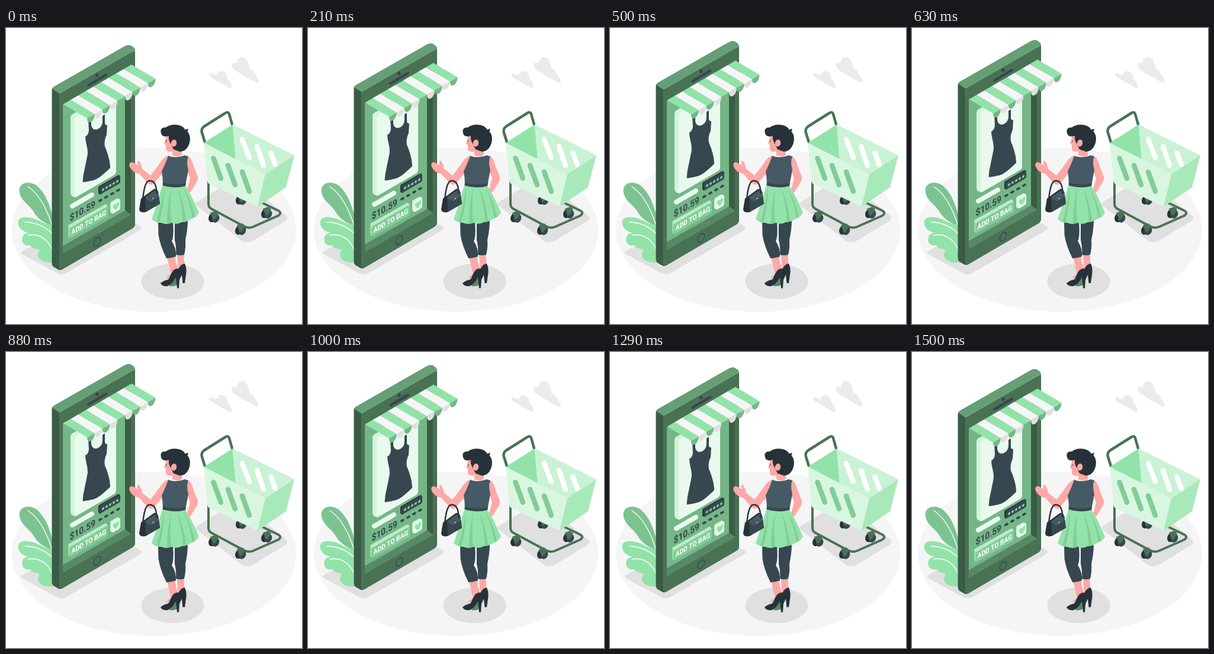
Recreate the animation shown at these times as an HTML page with a canvas. Size 500x500 px, loop 1.54 s.

```html
<!DOCTYPE html>
<html lang="en">
<head>
<meta charset="utf-8">
<title>Mobile shopping</title>
<style>
html, body { margin: 0; width: 100%; height: 100%; overflow: hidden; background: #fff; }
canvas { display: block; width: 500px; height: 500px; }
</style>
</head>
<body>
<canvas id="stage"></canvas>
<script>
const SIZE = 500, LOOP = 1540, STEPS = 37, LIFT = 10, REST = 1.2;
const canvas = document.getElementById('stage');
const ctx = canvas.getContext('2d');
const ratio = window.devicePixelRatio || 1;
canvas.width = canvas.height = SIZE * ratio;

const C = {
  green: '#92e3a9', mid: '#83cc98', leaf: '#7dc391', shade: '#75b687', moss: '#669f76', deep: '#588865',
  forest: '#497255', pine: '#3a5b44', pale: '#d3f4dc', mint: '#e9f9ee',
  slate: '#37474f', ink: '#263238', steel: '#455a64', skin: '#ffa8a7',
  floor: '#f5f5f5', shadow: '#e0e0e0', cloud: '#ebebeb', white: '#fff'
};

function fill(color, d) {
  ctx.fillStyle = color;
  ctx.fill(new Path2D(d));
}

function stroke(color, width, d) {
  ctx.strokeStyle = color;
  ctx.lineWidth = width;
  ctx.lineCap = ctx.lineJoin = 'round';
  ctx.stroke(new Path2D(d));
}

function ellipse(color, x, y, rx, ry = rx, angle = 0) {
  ctx.fillStyle = color;
  ctx.beginPath();
  ctx.ellipse(x, y, rx, ry, angle, 0, 7);
  ctx.fill();
}

// Draws in the isometric plane of the phone's front, with its origin at x, y.
function onFront(x, y, draw) {
  ctx.save();
  ctx.transform(0.866, -0.5, 0, 1, x, y);
  draw();
  ctx.restore();
}

function label(text, x, y, size, color) {
  onFront(x, y, () => {
    ctx.font = `bold ${size}px Roboto, sans-serif`;
    ctx.fillStyle = color;
    ctx.fillText(text, 0, 0);
  });
}

function star(x, y, r) {
  onFront(x, y, () => {
    ctx.beginPath();
    for (let i = 0; i < 10; i++) {
      const a = i * Math.PI / 5, d = i % 2 ? r * 0.45 : r;
      ctx.lineTo(d * Math.sin(a), -d * Math.cos(a));
    }
    ctx.fillStyle = C.green;
    ctx.fill();
  });
}

function drawGround() {
  ellipse(C.floor, 250, 341, 240, 138.5);
  fill(C.shadow, 'M27 377 L90 342 L180 308 L227 335 Q232 338 226 342 L102 414 Q95 418 88 415 L27 382 Q23 379 27 377Z');
  fill(C.shadow, 'M322 294 L370 265 H410 L472 316 Q478 321 472 326 L416 360 Q407 364 399 360 L322 300 Q319 297 322 294Z');
  ellipse(C.shadow, 281.5, 428, 53, 30);
}

function drawClouds() {
  fill(C.cloud, 'M343 78 Q346 74 352 79 Q356 81 359 74 Q364 71 368 74 Q374 77 374 86 Q382 93 381 101 Q378 102 374 99 L347 84 Q344 81 343 78Z');
  fill(C.cloud, 'M381 61 Q384 57 389 60 Q391 49 399 49 Q407 50 409 60 Q412 67 412 70 Q418 69 420 78 Q427 85 427 92 Q424 93 420 91 L386 71 Q381 66 381 61Z');
}

function drawLeaves() {
  fill(C.leaf, 'M22.500 274 C23 260 42 257 54 268 C68 281 74 301 79 318 V335 C64 329 53 322 47 311 C40 298 23 292 22.500 274Z');
  stroke(C.white, 1.4, 'M37 268 Q62 284 78 334');
  fill(C.green, 'M20.500 328 C21 318 36 318 48 322 C60 327 68 333 80 332 V396 C68 397 56 394 54 385 C53 380 57 378 56 374 C50 373 44 372 41 367 C32 369 26 364 27.500 355 C28 349 32 347 38 346 C28 344 20 337 20.500 328Z');
  stroke(C.white, 1.3, 'M32 328 Q58 328 78 347');
  stroke(C.white, 1.3, 'M37 350 Q64 345 78 374');
}

function drawCase() {
  fill(C.pine, 'M77.5 104 Q77.5 100 81 98 L200 30 Q207 26 212 29 L214 31 Q218 33 218 38 L218 330 Q218 334 214 337 L96 406 Q91 409 87 406 L80 402 Q77.5 400 77.5 396Z');
  fill(C.moss, 'M79 101 Q79 99 82 97.5 L200 30 Q207 26 212 29 L215 31 Q218 33 218 38 L91 109.5Z');
  fill(C.forest, 'M90.5 113 Q90.5 110 94 107.5 L211 40 Q217.5 36 217.5 42 L217.5 330 Q217.5 334 214 337 L96 405.5 Q90.5 408 90.5 403Z');
  stroke('#83b592', 0.7, 'M79 102 L90.5 109 L214 38');
  stroke('#5f8d6d', 0.6, 'M90.5 110 V404');
  stroke(C.slate, 4.5, 'M139.5 95.5 L169 78');
  ellipse(C.slate, 154, 78.5, 2.7, 3.2);
  onFront(154, 360, () => stroke(C.slate, 1.5, 'M-6.6 0 A6.6 6.6 0 1 1 6.6 0 A6.6 6.6 0 1 1 -6.6 0Z'));
  fill(C.shade, 'M96 128 L211 62 V314 L96 380Z');
  fill(C.pine, 'M211 62 V314 L201 307 V68Z');
  fill(C.deep, 'M96 380 L211 314 L201 307 L96 367Z');
}

function drawDressCard() {
  fill(C.pale, 'M109 150 Q109 146 113 144 L180 106 L186 112 L118 285 Q116 285 112 283 Q109 281 109 278Z');
  fill(C.mint, 'M116 154 Q116 150 120 147.5 L186 109 V241 Q186 245 182 247.5 L121 283 Q116 286 116 281Z');
  fill(C.slate, 'M139 154 L144 151 V163 Q146 172 154 170 Q162 167 163 158 V147 L167 145 V160 Q168 163 171 163 L170 179 Q165 190 167 199 Q172 210 175 224 Q176 232 176 235 Q171 240 164 246 Q153 256 143 257 Q134 259 129.5 259 Q130 248 133 236 Q136 222 138 211 Q138 203 136 196 Q134 188 134 182 Q139 180 140 172Z');
}

function drawDetails() {
  fill(C.ink, 'M156 269 Q156 266 159 265 L190 247 L193 249 L160 280 Q156 280 156 277Z');
  fill(C.slate, 'M158 270 Q158 267 161 265.5 L190 248.5 Q193 247 193 250 V258 Q193 260.5 190.5 262 L161 279 Q158 280.5 158 278Z');
  for (let i = 0; i < 5; i++) star(164 + 6 * i, 271.7 - 3.45 * i, 3.3);
  for (let i = 0; i < 4; i++) {
    stroke(C.slate, 3.7, `M${157.8 + 10 * i} ${291 - 5.75 * i} l3.2 -1.85`);
  }
  stroke(C.mint, 8, 'M112 299.5 L145 280.5');
  label('$10.59', 107.5, 325.5, 15.9, C.slate);
}

function drawButtons() {
  fill('#b8edc6', 'M105 332 L167 297 Q169 296 171 299 L172 303 L108 339Z');
  fill(C.green, 'M105 332 L108 338 V354 L105 350Z');
  fill(C.mid, 'M107.5 340 Q107.5 337 110 335.5 L169 301.5 Q172 300 172 303 V315 Q172 317.5 169.5 319 L110.5 353 Q107.5 354.5 107.5 351.5Z');
  label('ADD TO BAG', 110.5, 348, 11.8, C.white);

  fill(C.pale, 'M176 296 Q176 293 179 291.5 L188 286.5 Q190 286 193 289 L180 312 Q176 311 176 308Z');
  fill(C.mint, 'M179 298 Q179 295 181.5 293.5 L190 288.5 Q193 287 193 290 V302 Q193 305 190.5 306.5 L182 311.5 Q179 313 179 310Z');
  onFront(186, 300, () =>
    fill(C.green, 'M0 6 C-9 0 -6.5 -6 -3 -5.5 Q-1 -5 0 -3 Q1 -5 3 -5.5 C6.5 -6 9 0 0 6Z'));
}

function drawAwning() {
  const count = 9, dx = 115.5 / count, dy = -67 / count;
  for (let i = 0; i < count; i++) {
    const x = 137 + dx * i, y = 151.5 + dy * i, isGreen = i % 2 === 0;
    fill(isGreen ? C.shade : C.shadow,
      `M${x} ${y} C${x} ${y + 13} ${x + dx} ${y + dy + 13} ${x + dx} ${y + dy}Z`);
    fill(isGreen ? C.green : C.floor,
      `M${x} ${y} l${dx} ${dy} l-40.5 -24 l${-dx} ${-dy}Z`);
  }
}

function drawPhone(lift) {
  ctx.save();
  ctx.translate(0, REST - lift);
  drawCase();
  drawDressCard();
  drawDetails();
  drawButtons();
  drawAwning();
  ctx.restore();
}

function drawWheel(x, y) {
  ellipse(C.ink, x - 2, y + 1, 6.5, 8.5, 0.5);
  ellipse(C.slate, x + 3, y + 2.5, 6, 7.5, 0.5);
  fill(C.forest, `M${x - 6} ${y - 7} l9 -3 l5 4 l-5 9 l-4 2 l-3 -7Z`);
}

function drawCart() {
  drawWheel(397, 289);
  drawWheel(440, 312);
  stroke(C.forest, 4, 'M342 260 V297 Q342 303 347 305.5 L402 335 Q410 339 417 336 L460 317 Q466 313 461 309 L430 294');
  drawWheel(351, 319);
  drawWheel(396, 340);
  stroke(C.forest, 4.5, 'M336 193 L331 177 Q329 170 335 166 L370 144 Q376 140 377.5 147 L382 163');
  fill(C.green, 'M334 194 L383 163 L388 222Z');
  fill('#caf2d5', 'M383 163 L487 215 L438 247 L388 222Z');
  stroke(C.white, 8.5, 'M399 188 L411 219 M424 200 L435 232 M447.5 211 L455 231');
  fill('#d8f6e0', 'M334 194 L438 247 L425 302 L341 262Z');
  fill('#a8e9ba', 'M438 247 L487 215 L473 269 L425 302Z');
  stroke(C.mid, 8.5, 'M350.5 220 L363 254 M375 232 L387 265 M399 243 L411 276');
}

function drawLegs() {
  fill(C.skin, 'M289 382 L301 381 Q300 392 302 402 L293 412 Q289 398 289 382Z');
  fill(C.skin, 'M272 386 L286 385 Q286 398 291 408 L280 420 Q276 405 272 386Z');
  fill(C.slate, 'M285 327 L307 324 Q307 340 303 358 Q304 372 301 383 Q294 385 287 383 Q288 370 285 358Z');
  fill(C.slate, 'M257 327 L282 327 Q284 352 280 360 Q288 372 287 386 Q278 389 271 389 Q260 367 257.5 349Z');
  fill(C.ink, 'M291 407 Q296 398 302 398 Q306 407 304 417 L302 431 H298.5 L297 417 L292 427Z');
  fill(C.deep, 'M276 436 Q282 424 288 420 L289 434 Q284 437 276 436Z');
  fill(C.ink, 'M261 431 Q267 426 274 425 Q279 414 283 409 Q289 404 294 408 Q296 415 293 425 L292 439.5 H289 L287 421 Q280 434 273 436 Q263 437 261 431Z');
  fill(C.skin, 'M271 422 Q274 417 278 417 L275 424Z');
}

function drawSkirt() {
  fill(C.green, 'M265 264 Q284 272 303 266 Q306 272 311 280 Q319 295 326 312 Q321 320 314 322 Q305 328 297 328 Q288 333 280 329 Q271 333 262 329 Q252 329 246 323 Q252 306 257 291 Q261 275 265 264Z');
  fill(C.mid, 'M267 268 Q263 300 254 327 L259 328 Q267 300 267 268Z');
  fill(C.mid, 'M279 270 Q272 298 272 331 L279 329 Q276 300 279 270Z');
  fill(C.mid, 'M289 270 Q298 300 299 328 L304 327 Q301 295 289 270Z');
  fill(C.mid, 'M299 269 Q310 290 315 321 L319 319 Q313 290 299 269Z');
}

function drawBag() {
  fill(C.ink, 'M228 288 L250 272 Q255 271 257 277 L260 297 L236 311 Q225 313 225 306Z');
  fill(C.slate, 'M235 286 L251 274 Q256 273 257.5 278 L260 297 L236 310Z');
  fill(C.steel, 'M235 286 L252 274 Q256 274 257.5 279 L258 284 L247 292 Q240 293 235 286Z');
  ellipse(C.pale, 248.5, 288, 1.1);
  stroke(C.ink, 2.4, 'M231 290 Q234 257 243 258 Q254 258 254.5 279');
}

function drawUpperBody() {
  fill(C.skin, 'M307 216 Q314 220 317 234 L324 251 Q325 256 321 262 L311 278 Q307 276 306 273 L311 254 Q306 240 305 232Z');
  drawSkirt();
  fill(C.skin, 'M275 215 Q266 218 260 228 Q250 242 244 249 Q236 243 230 238 Q229 230 224 224 Q220 224 223 232 Q214 226 210 227 Q206 231 211 238 Q218 246 225 246 Q233 256 241 263 Q246 267 251 261 Q262 248 272 237Z');
  fill(C.steel, 'M274 216 Q288 221 302 215 L308 217 Q304 226 308 240 L303 266 Q284 272 265 265 Q265 253 263 242 Q270 228 274 216Z');
  fill(C.slate, 'M265 261 Q284 267 304 262 L303 267 Q284 272 264.5 266Z');
}

function drawHead() {
  fill(C.skin, 'M274 179 L270 184 Q269 191 267 195 L270 198 V205 Q271 209 278 209 L281 208 V215 Q288 219 297 215 V204 L291 186Z');
  fill(C.ink, 'M263.500 181 C259 173 262 167 270 168 C278 161 297 161 303 172 Q305 170 308 170.500 L306.500 175 C312 180 312 191 308.500 198 C305 206 300 208 294 209 L283 205 L278 195 Q274 189 275 182 Q268 185 263.500 181Z');
  ellipse(C.skin, 283.5, 194.5, 4.7, 6, 0.2);
  stroke(C.ink, 1, 'M270.5 190 L271 192');
}

function drawWoman() {
  drawLegs();
  drawUpperBody();
  drawBag();
  drawHead();
}

// The phone floats up and back at constant speed, in even steps.
function liftAt(time) {
  const step = Math.min(STEPS - 1, Math.floor((time + 1) / LOOP * STEPS));
  return LIFT * (1 - Math.abs(2 * step / (STEPS - 1) - 1));
}

const start = performance.now();

function render() {
  ctx.setTransform(ratio, 0, 0, ratio, 0, 0);
  ctx.fillStyle = C.white;
  ctx.fillRect(0, 0, SIZE, SIZE);
  drawGround();
  drawClouds();
  drawLeaves();
  drawPhone(liftAt((performance.now() - start) % LOOP));
  drawCart();
  drawWoman();
  requestAnimationFrame(render);
}

render();
</script>
</body>
</html>
```
